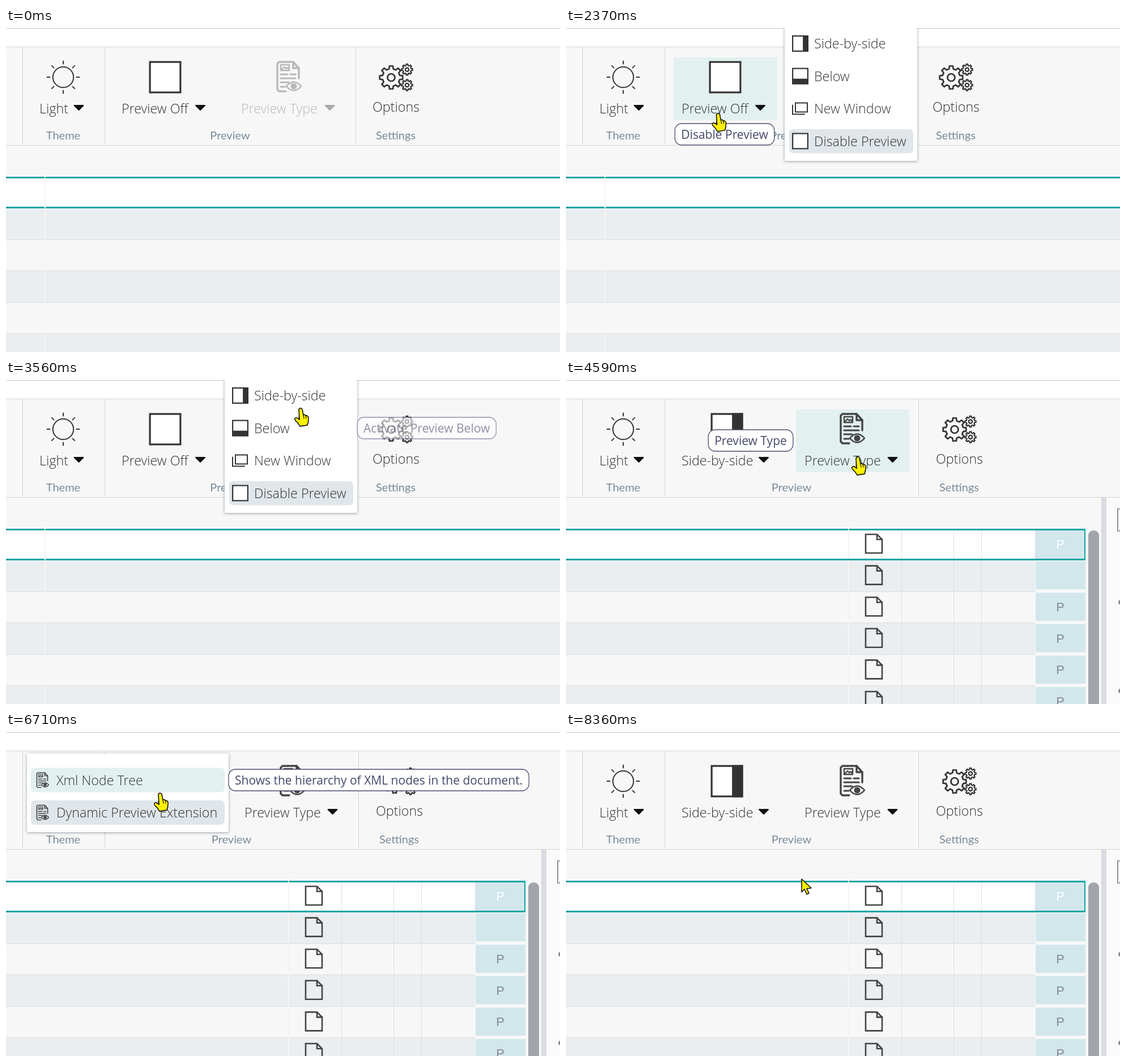
Recreate the animation shown at these times as an HTML page with a canvas. Size 978x573 px, loop 8430 ms.

```html
<!DOCTYPE html>
<html lang="en">
<head>
<meta charset="utf-8">
<title>Preview ribbon</title>
<style>
html, body { margin: 0; width: 100%; height: 100%; overflow: hidden; background: #f7f7f7; }
canvas { display: block; }
</style>
</head>
<body>
<canvas id="stage" width="978" height="573"></canvas>
<script>
const c = document.getElementById('stage').getContext('2d');
const LOOP = 8430, SPLIT = 3840;
const INK = '#333', DIM = '#b9b9b9', TEAL = '#12a5a1', RULE = '#d4d4d4';
const HOVER = '#e3f0f0', CHOSEN = '#e0e6ea', PAGE = '#f7f7f7';
const LABEL = '300 23.3px "Open Sans", sans-serif';
const GROUP = '20px Lato, sans-serif';
const TIP = '21px "Open Sans", "Noto Sans", sans-serif';

// Pointer track: time, x, y of the hot spot.
const track = [
  [70, 835, 520], [200, 822, 510], [410, 703, 418], [550, 517, 285], [620, 408, 222],
  [690, 300, 158], [900, 232, 98], [1040, 231, 92], [1160, 231, 92], [1450, 248, 145],
  [1900, 248, 145], [2040, 266, 151], [2220, 268, 151], [2370, 268, 151], [2680, 420, 166],
  [3000, 512, 150], [3140, 513, 138], [3300, 513, 112], [3430, 516, 88], [3560, 520, 50],
  [3700, 521, 38], [3840, 521, 38], [4200, 518, 84], [4590, 515, 136], [4660, 516, 143],
  [4730, 519, 152], [4930, 519, 152], [5200, 560, 152], [5730, 560, 152], [6060, 450, 118],
  [6300, 345, 93], [6570, 280, 92], [6710, 272, 108], [7050, 272, 137], [7980, 272, 137],
  [8140, 305, 228], [8260, 380, 258], [8360, 416, 260]
];

// Tooltips: start, end, centre x (or left edge when side is set), top, text, side.
const tips = [
  [1000, 2520, 280, 169, 'Disable Preview'],
  [3040, 3200, 620, 123, 'Activate Preview in New Window', 1],
  [3260, 3500, 620, 66, 'Activate Preview Below', 1],
  [3650, 3790, 620, 8, 'Activate Preview Side-by-side', 1],
  [4400, 5760, 326, 88, 'Preview Type'],
  [6130, 6760, 393, 66, 'Shows the hierarchy of XML nodes in the document.', 1],
  [7560, 8000, 284, 169, 'Activate Preview Side-by-side']
];

const within = (t, a, b) => t >= a && t < b;
const clamp = v => Math.max(0, Math.min(1, v));

function box(x, y, w, h, fill, r = 0) {
  c.fillStyle = fill;
  c.beginPath();
  c.roundRect(x, y, w, h, r);
  c.fill();
}

function text(s, x, y, font, fill, align = 'left') {
  c.font = font;
  c.fillStyle = fill;
  c.textAlign = align;
  c.fillText(s, x, y);
}

function stroke(color, width) {
  c.strokeStyle = color;
  c.lineWidth = width;
  c.lineJoin = c.lineCap = 'round';
}

function line(...p) {
  c.beginPath();
  for (let i = 0; i < p.length; i += 2) c.lineTo(p[i], p[i + 1]);
  c.stroke();
}

function circle(x, y, r) {
  c.beginPath();
  c.arc(x, y, r, 0, 7);
  c.stroke();
}

function caret(x, color) {
  c.fillStyle = color;
  stroke(color, 2);
  c.beginPath();
  c.moveTo(x - 8, 137);
  c.lineTo(x + 8, 137);
  c.lineTo(x, 145);
  c.closePath();
  c.fill();
  c.stroke();
}

function sun(x, y) {
  stroke(INK, 2);
  circle(x, y, 18.2);
  for (let i = 0; i < 8; i++) {
    const a = i * Math.PI / 4, u = Math.cos(a), v = Math.sin(a);
    line(x + u * 23.5, y + v * 23.5, x + u * 28.5, y + v * 28.5);
  }
}

function gear(x, y, r, teeth, hole, width) {
  stroke(INK, width);
  c.beginPath();
  for (let i = 0; i < teeth; i++) {
    for (const [k, q] of [[-.3, .76], [-.19, 1], [.19, 1], [.3, .76]]) {
      const a = (i + k) * 2 * Math.PI / teeth;
      c.lineTo(x + Math.cos(a) * r * q, y + Math.sin(a) * r * q);
    }
  }
  c.closePath();
  c.stroke();
  circle(x, y, hole);
}

// Square pane icon with an optional filled part.
function pane(x, y, s, kind, width) {
  box(x, y, s, s, '#fff');
  if (kind === 'side') box(x + s * .66, y, s * .34, s, INK);
  if (kind === 'below') box(x, y + s * .66, s, s * .34, INK);
  stroke(INK, width);
  c.lineJoin = 'miter';
  c.strokeRect(x + width / 2, y + width / 2, s - width, s - width);
}

function windows(x, y) {
  stroke(INK, 2);
  c.lineJoin = 'miter';
  c.strokeRect(x + 6, y + 4, 21, 16);
  line(x + 1, y + 8, x + 1, y + 24, x + 22, y + 24);
}

function report(x, y, scale, color) {
  c.save();
  c.translate(x, y);
  c.scale(scale, scale);
  stroke(color, 3.4);
  line(17, 54, 5, 54, 2, 51, 2, 5, 5, 2, 30, 2, 40, 13, 40, 31);
  line(30, 2, 30, 13, 40, 13);
  stroke(color, 2.4);
  c.strokeRect(8, 7, 15, 10);
  line(9, 16, 14, 11, 17, 14, 20, 12, 23, 16);
  stroke(color, 3);
  for (const [a, b, v] of [[8, 20, 24], [25, 34, 24], [8, 34, 31], [8, 22, 38], [8, 16, 46]]) line(a, v, b, v);
  stroke(color, 2.6);
  c.beginPath();
  c.moveTo(18, 45);
  c.quadraticCurveTo(31, 30, 44, 45);
  c.quadraticCurveTo(31, 60, 18, 45);
  c.stroke();
  c.fillStyle = color;
  c.beginPath();
  c.arc(31, 45, 5.5, 0, 7);
  c.fill();
  c.restore();
}

function sheet(x, y) {
  stroke('#444', 2.6);
  c.lineJoin = 'miter';
  c.beginPath();
  c.moveTo(x, y);
  for (const [u, v] of [[20, 0], [29, 9], [29, 33], [0, 33]]) c.lineTo(x + u, y + v);
  c.closePath();
  c.stroke();
  line(x + 20, y, x + 20, y + 9, x + 29, y + 9);
}

function grid(split) {
  const edge = split ? 917 : 978;
  for (let i = 0; i < 5; i++) {
    const y = 319 + i * 55.5;
    box(0, y, edge, 55.5, i % 2 ? PAGE : '#eaeef1');
    if (i) box(0, Math.round(y) - 1, edge, 1, '#dcdfe1');
  }
  box(0, 263, edge, 56, TEAL);
  box(0, 266, edge - (split ? 2 : 0), 50, '#fff');
  for (const x of split ? [499, 592, 684, 733, 828] : [69]) {
    box(x, 266, 1, 307, '#dcdfe1');
    if (x < 500) box(x - 1, 263, 1.5, 310, '#fafafa');
  }
  if (!split) return;

  for (let i = 0; i < 6; i++) {
    const y = 264 + i * 55.6;
    if (i) box(828, y - 3, 89, 59, PAGE);
    box(829, i ? y + 1 : 266, i ? 88 : 86, i ? 49.5 : 50, '#d2e7ec');
    sheet(529, y + 9);
    if (i !== 1) text('P', 872.5, y + 34, '22px "Liberation Sans", Arial, sans-serif', i ? '#858b92' : '#fff', 'center');
  }
  box(0, 316, 917, 3, TEAL);
  box(915, 263, 2, 56, TEAL);
  box(922, 266, 19, 330, '#a1a4a9', 9);
  box(945, 208, 9, 365, '#d9dce1');
  box(954, 208, 24, 365, '#fafafa');
  stroke('#777', 1.6);
  c.strokeRect(974, 228, 20, 39);
  for (const y of [393, 550]) {
    c.fillStyle = '#8b8e92';
    c.beginPath();
    c.arc(980, y, 5, 0, 7);
    c.fill();
  }
}

function ribbon(t, split) {
  const d = split ? 6 : 0;
  box(0, 0, 978, 34, '#fff');
  box(0, 0, 978, 1, '#c9c9c9');
  box(0, 33, 978, 1, RULE);
  box(0, 207, 978, 1, RULE);
  for (const x of [29, 174, split ? 622 : 617]) box(x, 35, 1, 171, RULE);

  if (within(t, 760, 2520)) box(190, 52, 183, 111, HOVER, 3);
  if (within(t, 4130, 5800)) box(406, 52, 200, 111, HOVER, 3);
  if (within(t, 7310, 8020)) box(190, 52, 189, 111, HOVER, 3);

  sun(101, 87);
  text('Light', 59, 151, LABEL, INK);
  caret(128.5, '#111');
  text('Theme', 101, 197, GROUP, '#7b8a97', 'center');

  pane(split ? 255.5 : 252.5, 58.5, 57, split ? 'side' : '', 3.2);
  text(split ? 'Side-by-side' : 'Preview Off', 204, 151, LABEL, INK);
  caret(split ? 349 : 343, '#111');

  const ink = split ? '#444' : DIM;
  report(477 + d, 58, 1, ink);
  text('Preview Type', 415 + d, 151, LABEL, split ? INK : DIM);
  caret(split ? 576.5 : 571.5, split ? '#111' : '#aaa');
  text('Preview', split ? 398 : 395.5, 197, GROUP, '#7b8a97', 'center');

  gear(680 + d, 87.5, 20.5, 8, 6.5, 2.7);
  gear(708 + d, 73.5, 9.8, 8, 3.2, 2.2);
  gear(708 + d, 101, 9.8, 8, 3.2, 2.2);
  text('Options', 647 + d, 148, LABEL, INK);
  text('Settings', 688 + d, 197, GROUP, '#7b8a97', 'center');
}

function panel(x, y, w, h) {
  c.save();
  c.shadowColor = 'rgba(60,75,95,.5)';
  c.shadowBlur = 5;
  c.shadowOffsetY = 1;
  box(x, y, w, h, '#fff', 2);
  c.restore();
}

function layoutMenu(t) {
  panel(386, -30, 234, 265);
  const over = within(t, 2900, 3210) ? 2 : within(t, 3260, 3510) ? 1 : within(t, 3600, SPLIT) ? 0 : -1;
  ['Side-by-side', 'Below', 'New Window', 'Disable Preview'].forEach((name, i) => {
    const y = 27.5 + i * 57.5;
    if (i === 3 || i === over) box(394, y - 21, 219, 42.5, i === 3 ? CHOSEN : HOVER, 7);
    if (i === 2) windows(399, y - 14);
    else pane(399, y - 14.5, 29, ['side', 'below', , ''][i], 2.2);
    text(name, 438, y + 8.5, LABEL, INK);
  });
}

function typeMenu(t) {
  panel(37, 38, 356, 139);
  const over = within(t, 6110, 6760) ? 0 : within(t, 6800, 7300) ? 1 : -1;
  ['Xml Node Tree', 'Dynamic Preview Extension'].forEach((name, i) => {
    const y = 85 + i * 57.5;
    if (i || i === over) box(44, y - 21.5, 342, 43, i ? CHOSEN : HOVER, 7);
    report(53.5, y - 14, .5, '#444');
    text(name, 89, y + 8.5, LABEL, INK);
  });
}

function tooltip(t, [from, to, x, y, s, side]) {
  const alpha = Math.min(clamp((t - from) / 40), clamp(1 - (t - to) / 150));
  if (alpha <= 0) return;
  c.save();
  c.globalAlpha = alpha;
  c.font = TIP;
  const w = c.measureText(s).width + 22, left = side ? x : x - w / 2;
  box(left, y, w, 38, '#fff', 12);
  stroke('#4a4e70', 1.3);
  c.stroke();
  text(s, left + w / 2, y + 26.5, TIP, '#45496a', 'center');
  c.restore();
}

const hand = new Path2D('M-3 3C-3-1 2-1 3 2L5 12Q7 10 9 13Q11 12 12 14Q14 14 14 18Q14 25 12 30L-1 32Q-4 26-8 23Q-12 19-9 17Q-6 16-2 20Z');
const arrow = new Path2D('M0 0L0 23L5 18L9 27L13 25L9 17L17 16Z');
const beam = new Path2D('M-6-13Q-1-13 0-10Q1-13 6-13M0-10V10M-6 13Q-1 13 0 10Q1 13 6 13');

function pointer(t) {
  if (t < 70) return;
  let i = track.findIndex(p => p[0] > t);
  if (i < 0) i = track.length - 1;
  const [t0, x0, y0] = track[i - 1], [t1, x1, y1] = track[i];
  const k = clamp((t - t0) / (t1 - t0));
  const x = x0 + (x1 - x0) * k, y = y0 + (y1 - y0) * k;
  c.save();
  c.translate(x, y);
  stroke('#111', 1.6);
  if (y > 264) {
    c.stroke(beam);
  } else {
    const shape = y > 170 || within(t, 690, 730) || t > 8020 ? arrow : hand;
    c.fillStyle = '#fff200';
    c.fill(shape);
    c.stroke(shape);
    if (shape === hand) {
      stroke('#111', 1.2);
      line(5, 12, 6, 18);
      line(9, 13, 10, 18);
      line(-2, 20, -3, 14);
    }
  }
  c.restore();
}

function draw(now) {
  const t = now % LOOP, split = t >= SPLIT;
  box(0, 0, 978, 573, PAGE);
  grid(split);
  ribbon(t, split);
  if (within(t, 1970, SPLIT)) layoutMenu(t);
  if (within(t, 5270, 7310)) typeMenu(t);
  for (const tip of tips) tooltip(t, tip);
  pointer(t);
}

const start = performance.now();
function tick() {
  draw(performance.now() - start);
  requestAnimationFrame(tick);
}
tick();
</script>
</body>
</html>
```
